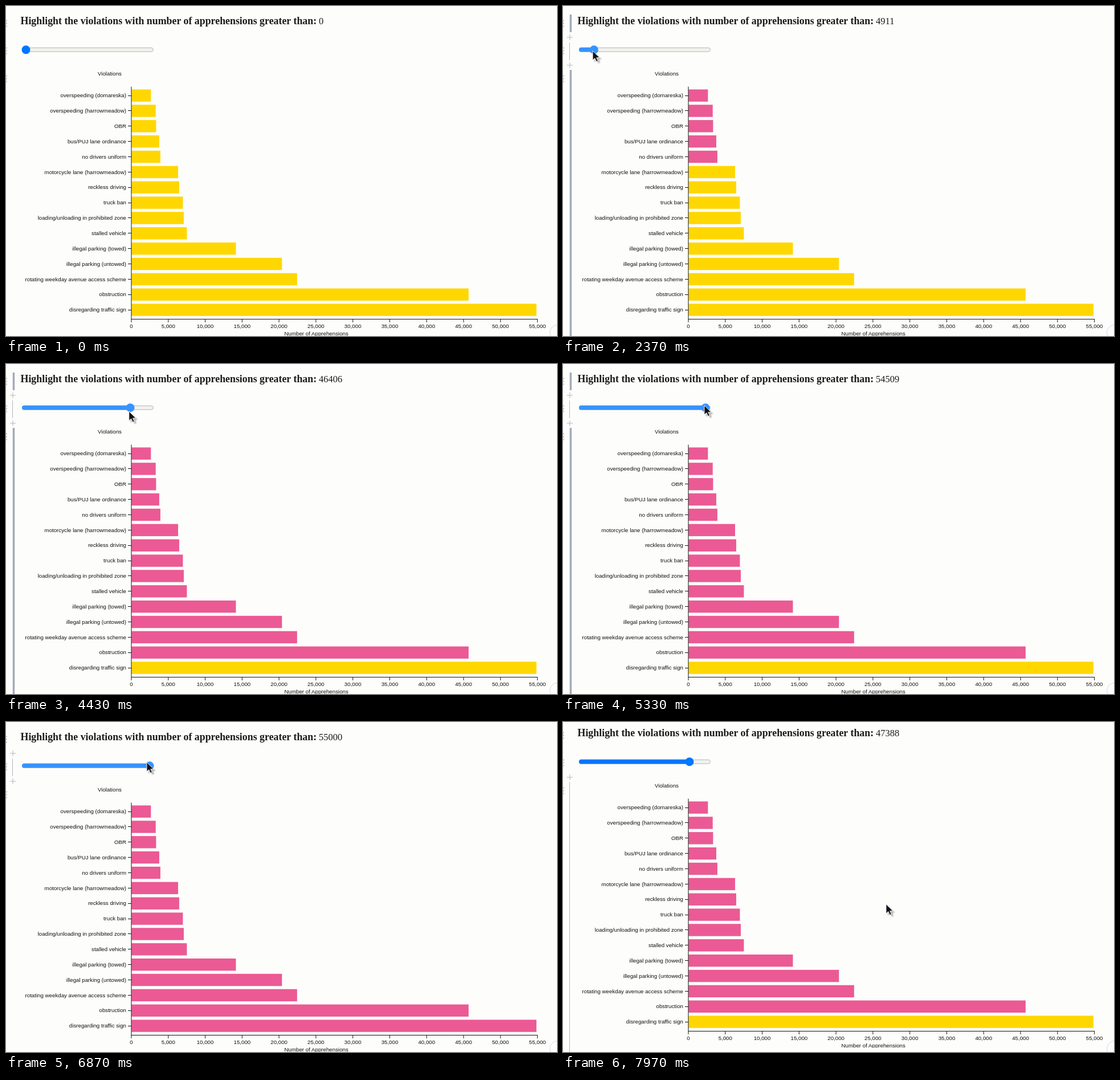
Write an HTML page that moves like this. It is 967x579 px and loops after 8000 ms.

```html
<!DOCTYPE html>
<html lang="en">
<head>
<meta charset="utf-8">
<style>
  html, body { margin: 0; width: 100%; height: 100%; overflow: hidden; background: #fdfdfb; }
  svg { display: block; }
  #chart text { font: 9.71px "Liberation Sans", Arial, sans-serif; fill: #111; }
  .title { font: bold 17.86px "Liberation Serif", "Times New Roman", serif; fill: #1b1b1b; }
  #value { font: 16.5px "Liberation Serif", "Times New Roman", serif; fill: #1b1b1b; }
  .axis { stroke: #111; fill: none; }
  .mark { stroke: #b4b4bf; fill: none; }
</style>
</head>
<body>
<svg id="stage" width="967" height="579" viewBox="0 0 967 579">
  <defs>
    <filter id="soft" x="-50%" y="-50%" width="200%" height="200%"><feGaussianBlur stdDeviation="1.2"/></filter>
  </defs>
  <g id="page">
    <g id="handles" stroke="#c3c3c6" stroke-width="2"></g>
    <path id="hover" class="mark"/>
    <path id="linked" stroke="#a3abb9" stroke-width="3.5" d="M13.5 15V46M13.5 112V600"/>
    <text class="title" x="25.5" y="32">Highlight the violations with number of apprehensions greater than:</text>
    <text id="value" x="549" y="32"></text>
    <rect x="28.5" y="73.3" width="230" height="6.8" rx="3.4" fill="#f1f1ee" stroke="#b5b5b3"/>
    <rect id="fill" x="28" y="72.8" height="7.8" rx="3.9"/>
    <circle id="thumb" cy="76.7" r="7.5"/>
    <svg id="chart" width="967" height="578.5">
      <text x="161" y="121.5">Violations</text>
      <text x="544.7" y="577.6" text-anchor="middle">Number of Apprehensions</text>
    </svg>
  </g>
  <circle cx="968" cy="573" r="13.5" fill="#fdfdfd" stroke="#d9d9e6"/>
  <g id="cursor">
    <path d="M3 4V20L7 17L10 22L13 21L11 15H16Z" fill="#000" opacity=".3" filter="url(#soft)"/>
    <path d="M0 0V16.5L3.9 13L6.6 19L9.4 17.8L6.8 12H12Z" fill="#101018" stroke="#fff" stroke-width=".9"/>
  </g>
</svg>
<script>
const LOOP = 8000, MAX = 55000, STEPS = 224;
const X0 = 220, CHART_WIDTH = 712.6, ROW = 376 / 14;
const THUMB_START = 35, THUMB_TRAVEL = 217;

const violations = [
  ["overspeeding (domareska)", 2650], ["overspeeding (harrowmeadow)", 3300],
  ["OBR", 3350], ["bus/PUJ lane ordinance", 3780], ["no drivers uniform", 3930],
  ["motorcycle lane (harrowmeadow)", 6330], ["reckless driving", 6480],
  ["truck ban", 6980], ["loading/unloading in prohibited zone", 7100],
  ["stalled vehicle", 7520], ["illegal parking (towed)", 14160],
  ["illegal parking (untowed)", 20400], ["rotating weekday avenue access scheme", 22450],
  ["obstruction", 45680], ["disregarding traffic sign", 54870]
];

// Pointer path: time, x, y
const pointerPath = [
  [60, 975, 470], [450, 560, 260], [800, 120, 110], [1000, 35, 82], [1130, 35, 82],
  [1500, 34, 82], [1650, 34, 82], [2370, 53, 80], [3430, 156, 92], [4170, 205, 88],
  [4900, 238, 78], [5330, 249, 74], [5600, 252, 74], [6400, 250, 75], [6870, 248, 72],
  [6980, 248, 72], [7380, 218, 72], [7500, 218, 72], [7900, 568, 321], [8000, 568, 321]
];

const byId = id => document.getElementById(id);
const chart = byId("chart");
const between = (t, from, to) => t >= from && t < to;
const clamp = (v, low, high) => Math.min(high, Math.max(low, v));

function add(parent, tag, attributes, text = "") {
  const node = document.createElementNS("http://www.w3.org/2000/svg", tag);
  for (const key in attributes) node.setAttribute(key, attributes[key]);
  node.textContent = text;
  return parent.appendChild(node);
}

function set(id, attributes) {
  for (const key in attributes) byId(id).setAttribute(key, attributes[key]);
}

const bars = violations.map(([name, count], i) => {
  const y = 157 + i * ROW;
  add(chart, "text", { x: 211, y: y + 3.3, "text-anchor": "end" }, name);
  add(chart, "path", { class: "axis", d: `M214 ${Math.floor(y) + .5}H${X0}` });
  return add(chart, "rect", { x: X0 + .3, y: y - 10.6, width: count / MAX * CHART_WIDTH - .3, height: 21.4 });
});

for (let n = 0; n <= MAX; n += 5000) {
  const x = X0 + n / MAX * CHART_WIDTH;
  add(chart, "path", { class: "axis", d: `M${x} 549V555` });
  add(chart, "text", { x, y: 564.5, "text-anchor": "middle" }, n.toLocaleString("en-US"));
}
add(chart, "path", { class: "axis", d: `M${X0} 141.5V549.5H933` });

for (const y of [30.5, 78.5, 127.5])
  for (const dy of [-5, 0, 5]) add(byId("handles"), "path", { d: `M0 ${y + dy}h2` });

function pointerAt(t) {
  const i = pointerPath.findIndex(p => p[0] > t);
  if (i < 1) return pointerPath[0].slice(1);
  const [t0, x0, y0] = pointerPath[i - 1], [t1, x1, y1] = pointerPath[i];
  const u = (t - t0) / (t1 - t0);
  return [x0 + (x1 - x0) * u, y0 + (y1 - y0) * u];
}

function sliderStep(t, x) {
  const toStep = thumbX => clamp(Math.round((thumbX - THUMB_START) * STEPS / THUMB_TRAVEL), 0, STEPS);
  if (t < 1500) return 0;
  if (t < 5950) return toStep(x + 1);
  if (t < 6850) return STEPS;
  return toStep(t < 7450 ? x + 4 : 222);
}

const plus = y => `M7 ${y}h10M12 ${y - 5}v10`;
function hoverMarks(y) {
  if (y < 50) return "M11.5 15V46" + plus(55);
  if (y < 104) return plus(55) + "M11.5 64V95" + plus(104);
  return plus(104) + "M11.5 112V600";
}

function draw(t) {
  const [x, y] = pointerAt(t);
  const step = sliderStep(t, x);
  const value = Math.round(step * MAX / STEPS);
  const thumbX = THUMB_START + step * THUMB_TRAVEL / STEPS;
  const dragging = between(t, 1500, 5950) || between(t, 6850, 7450);
  const blue = dragging ? "#3793ff" : "#0077ff";
  const scroll = 7 * clamp((t - 7850) / 110, 0, 1);

  set("page", { transform: `translate(0 ${-scroll})` });
  set("cursor", { transform: `translate(${x - 1} ${y - 1.4})` });
  set("hover", { d: t < 60 ? "" : hoverMarks(y + scroll) });
  set("linked", { visibility: between(t, 1560, 6100) || between(t, 6950, 7550) ? "visible" : "hidden" });
  set("fill", { width: thumbX - 28, fill: blue });
  set("thumb", { cx: thumbX, fill: blue });
  byId("value").textContent = value;
  bars.forEach((bar, i) => bar.setAttribute("fill", violations[i][1] < value ? "#eb5a94" : "#ffd700"));
}

const start = performance.now();
function tick() {
  draw((performance.now() - start) % LOOP);
  requestAnimationFrame(tick);
}
tick();
</script>
</body>
</html>
```
